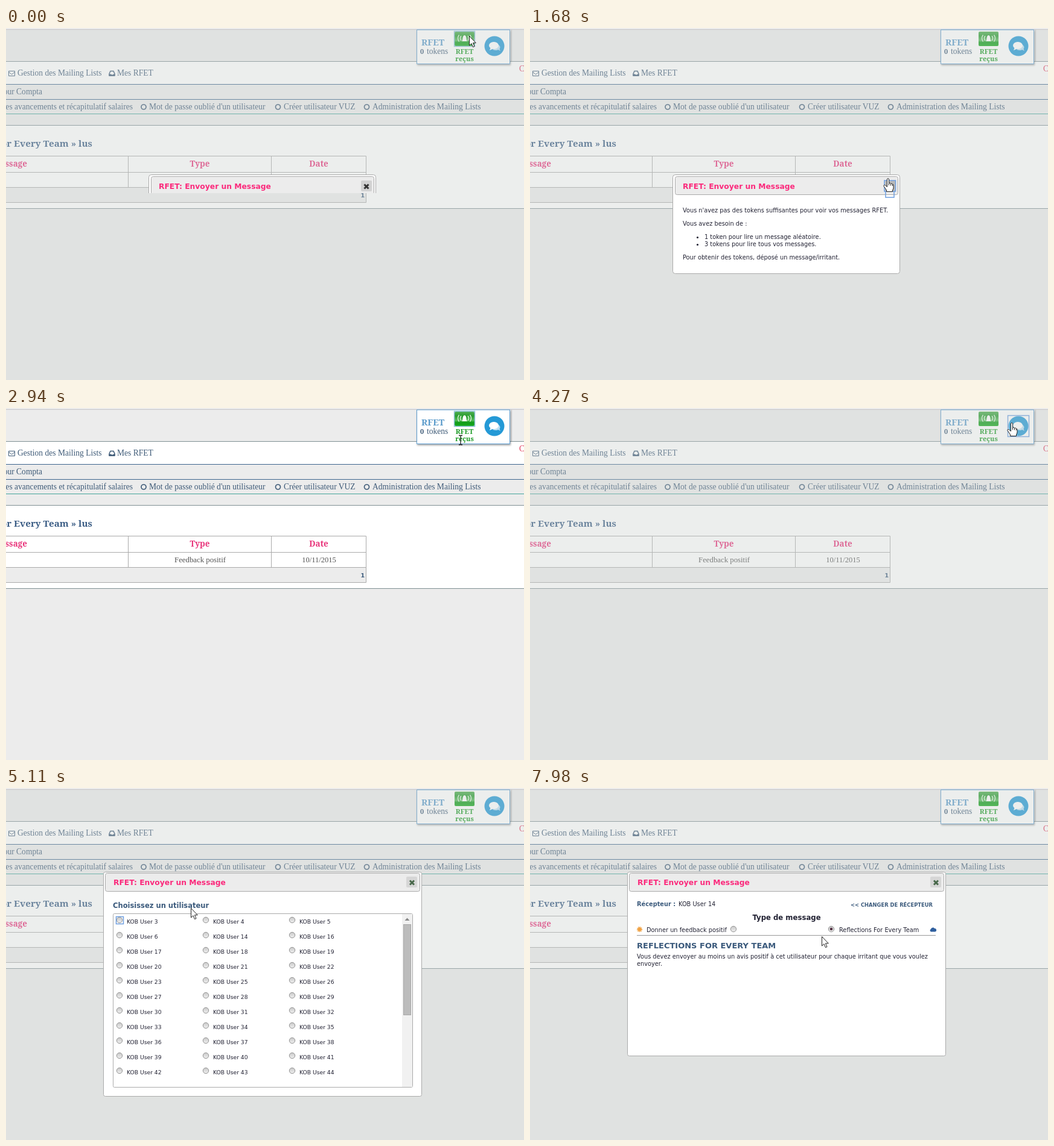
An HTML page for the animation above (8000 ms loop, 858 px wide and 584 px high).

```html
<!DOCTYPE html>
<html lang="fr">
<head>
<meta charset="utf-8">
<title>Messages</title>
<style>
html, body { margin: 0; width: 100%; height: 100%; overflow: hidden; background: #ececec; }
svg { display: block; }
text { font: 9.8px "DejaVu Sans", sans-serif; fill: #223; }
.s { font: 13.55px "Liberation Serif", serif; fill: #3f5b78; }
.sb { font: bold 13.5px "Noto Serif", serif; fill: #e8357b; }
.t { font-weight: bold; font-size: 12.3px; fill: #fb2a7c; }
.h { font-weight: bold; fill: #3b5a7c; }
.m { text-anchor: middle; }
.e { text-anchor: end; }
.ring { fill: none; stroke: #6f9fe0; stroke-width: 1.5; }
.bar { fill: #ececec; stroke: #aaa; }
.box { fill: #fff; stroke: #aaa; }
.line { stroke: #999; }
.x { stroke-width: 3; fill: none; }
</style>
</head>
<body>
<svg width="858" height="584" viewBox="0 0 858 584">
<defs>
  <linearGradient id="green" x2="0" y2="1">
    <stop offset="0" stop-color="#4fae50"/><stop offset=".3" stop-color="#2a9d30"/>
    <stop offset=".6" stop-color="#58bb5a"/><stop offset=".75" stop-color="#0f9c18"/>
    <stop offset="1" stop-color="#16a81c"/>
  </linearGradient>
  <linearGradient id="ball" x2="0" y2="1">
    <stop offset="0" stop-color="#c8c8c8"/><stop offset="1" stop-color="#f0f0f0"/>
  </linearGradient>
  <filter id="shade" x="-10%" y="-10%" width="120%" height="130%">
    <feDropShadow dx="1" dy="2" stdDeviation="1.5" flood-opacity=".35"/>
  </filter>
  <clipPath id="cut"><rect id="cutRect" width="858" height="584"/></clipPath>
</defs>

<rect width="858" height="584" fill="#ececec"/>
<path d="M0 56H858V93H0ZM0 162H858V299H0Z" fill="#fff"/>
<path d="M0 2.5H858M837.5 3V55" stroke="#c4c4c8"/>
<path d="M0 55.5H858M0 161.5H858M0 299.5H858" stroke="#7f8f93"/>
<path d="M0 93.5H858M0 118.5H858" stroke="#3c648c"/>
<path d="M0 142.5H858" stroke="#43a59a"/>

<g fill="none" stroke="#3f5b78">
  <path d="M4.5 71.5H14.5V79.5H4.5ZM4.5 73L9.5 77 14.5 73"/>
  <path d="M171 76L173 71.5H178L180 76V79H171Z" stroke-width="1.5"/>
  <path d="M171 77H174L175 78H177L178 77H180V79H171Z" fill="#3f5b78"/>
  <g stroke-width="1.7"><circle cx="228" cy="131" r="4"/><circle cx="450.5" cy="131" r="4"/><circle cx="597.5" cy="131" r="4"/></g>
</g>
<text class="s" x="19" y="79">Gestion des Mailing Lists</text>
<text class="s" x="184" y="79">Mes RFET</text>
<text class="s" x="850" y="72" style="fill:#e2405f">C</text>
<text class="s e" x="60" y="110">Pour Compta</text>
<text class="s e" x="210" y="135">les avancements et récapitulatif salaires</text>
<text class="s" x="237" y="135">Mot de passe oublié d'un utilisateur</text>
<text class="s" x="460" y="135">Créer utilisateur VUZ</text>
<text class="s" x="607" y="135">Administration des Mailing Lists</text>

<text class="sb e" x="143" y="197" style="font-size:15.2px;fill:#3b5d85">Reflections For Every Team » lus</text>
<path d="M0 265H597V289H0Z" fill="#ececec"/>
<path d="M0 212.5H596.5V289.5H0M0 239.5H596M0 264.5H596M202.5 212V264M439.5 212V264" fill="none" stroke="#aaa"/>
<text class="sb e" x="35" y="230">Message</text>
<text class="sb m" x="321" y="230">Type</text>
<text class="sb m" x="518" y="230">Date</text>
<text class="s m" x="321.5" y="256" style="font-size:12.8px;fill:#555">Feedback positif</text>
<text class="s m" x="518.5" y="256" style="font-size:12.5px;fill:#555">10/11/2015</text>
<text class="h e" x="594" y="281" style="font-size:9.5px">1</text>

<path d="M680.5 3V59.5H834.5V3Z" fill="#fff" stroke="#5a9bcf" filter="url(#shade)"/>
<text class="sb" x="688" y="29" style="font-size:14.5px;fill:#5b9bcb">RFET</text>
<text class="sb" x="686" y="43" style="font-size:11px;fill:#3f5b78">0</text>
<text class="s" x="697" y="43">tokens</text>
<rect x="743" y="6" width="33" height="24" rx="2" fill="url(#green)"/>
<path d="M755 22C757.5 20 755.5 12.5 759.5 12C763.5 12.500 761.5 20 764 22Z" fill="#fff"/>
<path d="M754 13Q751 17 754 21M750.5 11.5Q746.5 17 750.5 22.5M765 13Q768 17 765 21M768.5 11.5Q772.5 17 768.5 22.5" fill="none" stroke="#d5f0d5" stroke-width="1.5"/>
<rect id="bellRing" class="ring" x="742.5" y="5.5" width="34" height="25" style="stroke:#8fc0dc"/>
<text class="sb m" x="759.5" y="43" style="font-size:11.2px;fill:#1c9a26">RFET</text>
<text class="sb m" x="759.5" y="55" style="font-size:11px;fill:#1c9a26">reçus</text>
<circle cx="809" cy="30" r="16.5" fill="#2499d6"/>
<path d="M806 36Q813 38 815 36L819 38 817.5 35Q820 31 816 28Z" fill="#b9dff3"/>
<ellipse cx="808" cy="29" rx="8" ry="6" fill="#fff"/><path d="M803 32L801 37 808 34Z" fill="#fff"/>
<rect id="chatRing" class="ring" x="791.5" y="12.5" width="35" height="35"/>

<rect id="dim" y="3" width="858" height="581" fill="#c8cecb" opacity=".35"/>

<g clip-path="url(#cut)">
  <g id="notice">
    <rect class="box" x="236.5" y="243.5" width="376" height="164" rx="4"/>
    <rect class="bar" x="240.5" y="246.5" width="369" height="30" rx="3"/>
    <text class="t" x="253" y="267">RFET: Envoyer un Message</text>
    <rect x="588" y="253" width="18" height="18" rx="2" fill="#d2d2d2"/>
    <g id="closeRing">
      <rect x="588" y="253" width="18" height="18" fill="#b9b9b9"/>
      <path class="ring" d="M587 253H605.5V271H587ZM589 271V281H603V271"/>
    </g>
    <path class="x" d="M593.5 259.5L600.5 266.5M600.5 259.5L593.5 266.5" stroke="#333"/>
    <text x="253" y="306">Vous n'avez pas des tokens suffisantes pour voir vos messages RFET.</text>
    <text x="253" y="328">Vous avez besoin de :</text>
    <circle cx="277.5" cy="347.5" r="1.6" fill="#223"/><circle cx="277.5" cy="359.5" r="1.6" fill="#223"/>
    <text x="289" y="350">1 token pour lire un message aléatoire.</text>
    <text x="289" y="362">3 tokens pour lire tous vos messages.</text>
    <text x="253" y="384">Pour obtenir des tokens, déposé un message/irritant.</text>
  </g>

  <g id="form">
    <rect id="frame" class="box" x="161.5" y="139.5" width="527" height="372" rx="3"/>
    <rect class="bar" x="164.5" y="141.5" width="521" height="30" rx="3"/>
    <text class="t" x="178" y="161">RFET: Envoyer un Message</text>
    <rect x="663" y="147" width="18" height="18" rx="2" fill="#d6d6d6"/>
    <path class="x" d="M669 153.5L676 160.5M676 153.5L669 160.5" stroke="#48684a"/>

    <g id="users">
      <text class="h" x="177" y="199" style="font-size:11.5px">Choisissez un utilisateur</text>
      <rect class="box" x="177.5" y="208.5" width="496" height="288" rx="2"/>
      <rect x="656" y="209" width="17" height="287" fill="#f1f1f1"/>
      <path d="M660.5 220L664.5 215.5 668.5 220Z" fill="#888"/>
      <rect x="658.5" y="226.5" width="12" height="150" fill="#bcbcbc" stroke="#a8a8a8"/>
      <g id="list"></g>
      <rect id="radioRing" class="ring" x="182.5" y="213.5" width="12" height="12"/>
      <circle id="pick" cx="331" cy="244" r="2.3" fill="#444"/>
    </g>

    <g id="types">
      <text class="h" x="177" y="196">Récepteur :</text>
      <text x="246" y="196">KOB User 14</text>
      <text class="h" x="531" y="197" style="font-size:8.4px">&lt;&lt; CHANGER DE RÉCEPTEUR</text>
      <text class="m" x="425" y="219" style="font-size:11.7px;font-weight:bold">Type de message</text>
      <circle cx="181.5" cy="234.5" r="3" fill="#f0a040"/>
      <circle cx="181.5" cy="234.5" r="3.6" fill="none" stroke="#f0a040" stroke-width="2" stroke-dasharray="1.4 1"/>
      <text x="193" y="239">Donner un feedback positif</text>
      <text x="512" y="239">Reflections For Every Team</text>
      <path d="M664 238.5A2.5 2.5 0 0 1 664 234A3.4 3.4 0 0 1 670 233A2.8 2.8 0 0 1 671 238.5Z" fill="#2f5f9e"/>
      <g id="radios"></g>
      <circle id="dotA" cx="337" cy="234" r="2.3" fill="#444"/>
      <circle id="dotB" cx="499" cy="234" r="2.3" fill="#534"/>
      <path class="line" d="M177 244.5H672"/>
    </g>

    <g id="praise">
      <text class="h" x="177" y="266" style="font-size:13px">FEEDBACK POSITIF</text>
      <text x="177" y="286">Donne un avis positif à un de tes collègues. (chaque RFET te donne droit à 1 token)</text>
      <rect class="box" x="182.5" y="295.5" width="442" height="95"/>
      <path d="M615 388L622 381M619 388L622 385" stroke="#666"/>
      <path class="line" d="M177 397.5H672"/>
      <rect x="590.5" y="407.5" width="81" height="14" fill="#e3e3e3" stroke="#8c8c8c"/>
      <text class="m" x="631" y="418">Envoyer RFET</text>
    </g>

    <g id="gripe">
      <text class="h" x="177" y="266" style="font-size:13px">REFLECTIONS FOR EVERY TEAM</text>
      <text x="177" y="283">Vous devez envoyer au moins un avis positif à cet utilisateur pour chaque irritant que vous voulez</text>
      <text x="177" y="295">envoyer.</text>
    </g>
  </g>
</g>

<g id="cursor" stroke-linejoin="round">
  <path id="arrow" d="M.5 .5V16L4 12.7 6.5 18.6 9 17.5 6.5 11.8H11.3Z" fill="#fff" stroke="#222"/>
  <path id="hand" d="M-1.5 1.5Q0 -.5 1.5 1.5V8.5Q4 7.5 4.5 9.3Q7 8.5 7.3 10.2Q9 10 9 12V16Q9 18 7.5 20V22.5H-2.5V20L-7 13.5Q-7.5 10.5 -4.5 12L-1.5 14.5ZM1.5 8.5V12M4.5 9.5V12.5M7.3 10.5V13" fill="#fff" stroke="#222"/>
  <path id="beam" d="M-3 -7.5H-1L0 -6.5 1 -7.5H3M0 -6.5V7M-3 8H-1L0 7 1 8H3" fill="none" stroke="#222" stroke-width="1.3"/>
</g>
</svg>
<script>
const LOOP = 8000, STEP = 70;
const $ = id => document.getElementById(id);
const show = (id, on) => $(id).style.display = on ? '' : 'none';
const swing = p => .5 - .5 * Math.cos(Math.PI * Math.min(1, Math.max(0, p)));
const radio = (x, y) => `<circle cx="${x}" cy="${y}" r="4.7" fill="url(#ball)" stroke="#929292"/>`;

const firstIds = [3, 4, 5, 6, 14, 16, 17, 18, 19, 20, 21, 22, 23];
for (let i = 0; i < 33; i++) {
  const x = 188 + i % 3 * 143, y = 219 + Math.floor(i / 3) * 25;
  $('list').innerHTML += radio(x, y) +
    `<text x="${x + 12}" y="${y + 6}" style="font-size:9.2px">KOB User ${firstIds[i] || i + 12}</text>`;
}
$('radios').innerHTML = radio(337, 234) + radio(499, 234);

// Pointer route: time, x, y
const route = [
  [0, 767, 13], [490, 767, 13], [700, 745, 50], [1330, 611, 232], [1470, 600, 236],
  [1540, 589, 240], [1610, 589, 240], [1750, 596, 258], [2100, 596, 258], [2380, 630, 155],
  [2590, 690, 86], [2940, 753, 53], [3220, 740, 53], [3710, 790, 26], [3780, 798, 24],
  [4270, 798, 24], [4480, 779, 22], [4550, 779, 22], [5040, 300, 189], [5390, 329, 239],
  [6020, 329, 239], [6160, 335, 240], [6580, 524, 233], [6790, 524, 233], [6930, 525, 238],
  [7280, 525, 238], [7560, 490, 252], [7770, 490, 252], [7980, 483, 246]
];

function pointer(t) {
  const i = Math.max(1, route.findIndex(k => k[0] >= t));
  const [t0, x0, y0] = route[i - 1], [t1, x1, y1] = route[i];
  const p = (t - t0) / (t1 - t0);
  return [Math.round(x0 + (x1 - x0) * p), Math.round(y0 + (y1 - y0) * p)];
}

function draw(t) {
  const within = (a, b) => t >= a && t < b;

  show('dim', t < 2100 || t >= 4270);
  show('bellRing', t < 280 || within(2100, 3990));
  show('chatRing', within(3990, 4760));

  show('notice', t < 2500);
  $('notice').style.opacity = 1 - swing((t - 2100) / 400);
  show('closeRing', within(350, 2100));

  show('form', t >= 4350);
  show('users', t < 6090);
  show('radioRing', within(4760, 5810));
  show('pick', t >= 5810);
  show('types', t >= 6090);
  show('dotA', t < 7210);
  show('dotB', t >= 7070);
  show('praise', within(6090, 7210));
  show('gripe', t >= 7210);
  $('frame').setAttribute('height', t < 6090 ? 372 : 305);

  const bottom = t < 2600 ? 244 + 164 * swing((t + 112) / 400) : 139 + 373 * swing((t - 4350) / 400);
  $('cutRect').setAttribute('height', Math.round(bottom));

  const hand = within(1540, 2170) || within(3780, 4340), beam = within(2940, 3010);
  show('hand', hand);
  show('beam', beam);
  show('arrow', !hand && !beam);
  $('cursor').setAttribute('transform', `translate(${pointer(t)})`);
}

function tick() {
  const t = performance.now() % LOOP;
  draw(Math.floor(t / STEP) * STEP);
  requestAnimationFrame(tick);
}
tick();
</script>
</body>
</html>
```
